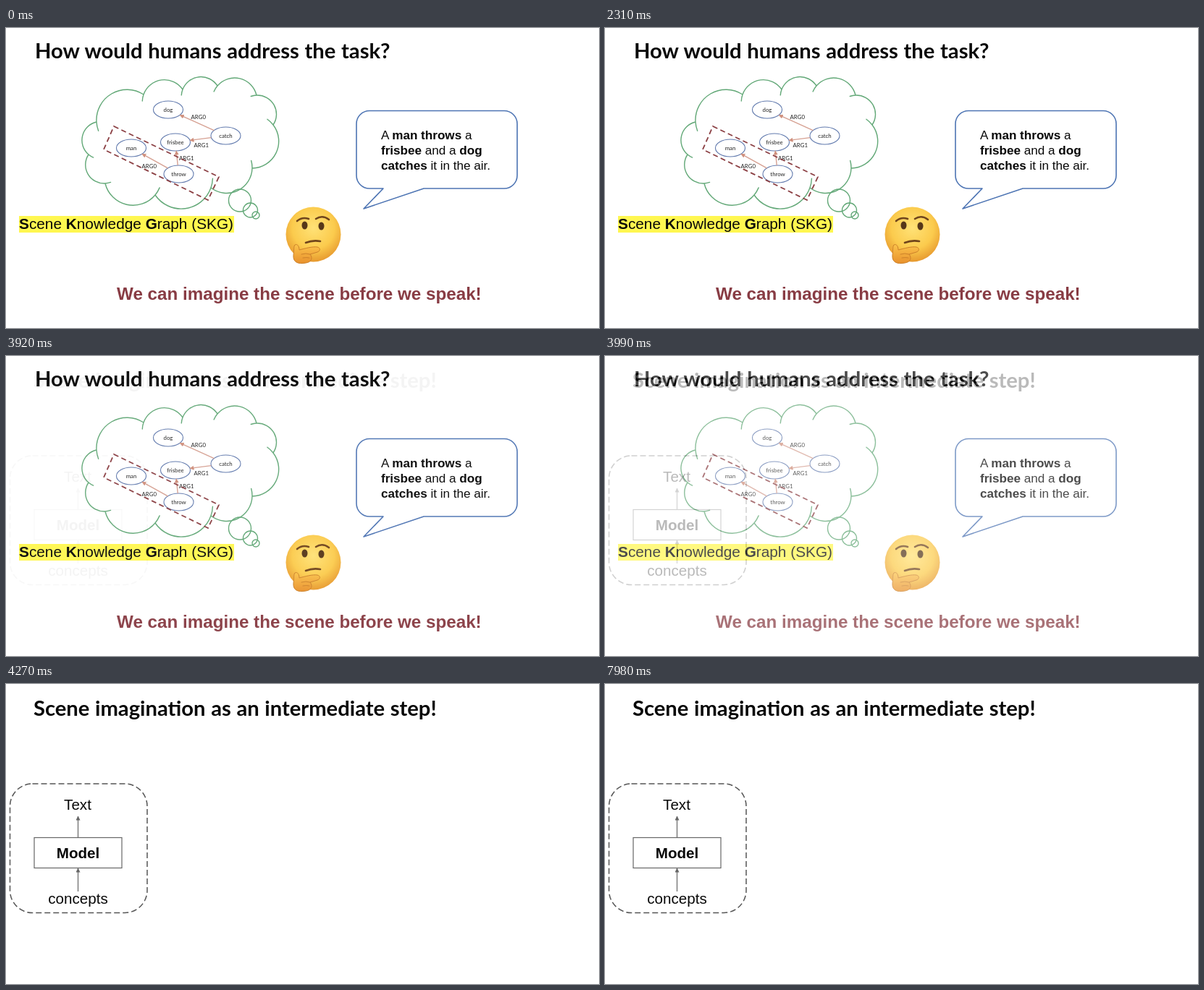
Animation, 819 px wide and 415 px high, one loop 8 s. Source, as an HTML page:

```html
<!DOCTYPE html>
<html lang="en">
<head>
<meta charset="utf-8">
<title>Scene imagination</title>
<style>
  html, body { margin: 0; width: 100%; height: 100%; overflow: hidden; background: #fff; }
  svg { display: block; width: 819px; height: 415px; }
  text { font-family: "Liberation Sans", Arial, sans-serif; fill: #080808; }
  .title { font: bold 29.2px Lato, sans-serif; word-spacing: .5px; }
  .bold, tspan { font-weight: bold; }
  .mid { text-anchor: middle; }
  .speech { font-size: 17.1px; }
  .label { font-size: 20.6px; }
  .small text { font: 7.8px Lato, sans-serif; text-anchor: middle; fill: #222; }
  .line { fill: none; stroke-linecap: round; stroke-linejoin: round; }
</style>
</head>
<body>
<svg viewBox="0 0 819 415">
  <defs>
    <radialGradient id="skin" cx=".5" cy=".38" r=".64">
      <stop offset="0" stop-color="#ffe277"/>
      <stop offset=".6" stop-color="#fbcb4d"/>
      <stop offset="1" stop-color="#e5952c"/>
    </radialGradient>
    <linearGradient id="palm" x2="0" y2="1">
      <stop offset="0" stop-color="#fbc34b"/>
      <stop offset="1" stop-color="#e8912d"/>
    </linearGradient>
    <marker id="tan" viewBox="0 0 6 6" refX="5.5" refY="3" markerWidth="6" markerHeight="6" markerUnits="userSpaceOnUse" orient="auto">
      <path d="M0 0 6 3 0 6z" fill="#cf8f7c"/>
    </marker>
    <marker id="gray" viewBox="0 0 6 6" refX="5.5" refY="3" markerWidth="6" markerHeight="6" markerUnits="userSpaceOnUse" orient="auto">
      <path d="M0 0 6 3 0 6z" fill="#666"/>
    </marker>
  </defs>

  <g id="humans">
    <rect width="819" height="415" fill="#fff"/>
    <text class="title" x="40" y="42">How would humans address the task?</text>

    <g class="line" stroke="#62a877" stroke-width="1.4">
      <path id="cloud"/>
      <circle cx="323" cy="238.5" r="15.5"/>
      <circle cx="337.5" cy="252" r="10"/>
      <circle cx="345" cy="259" r="5"/>
    </g>
    <g id="graph" class="small"></g>
    <path d="M149 136 294 206 279 238 135 168z" fill="none" stroke="#8b3f43" stroke-width="1.8" stroke-dasharray="7 4.5"/>

    <rect x="18" y="260" width="297" height="23" fill="#fff750"/>
    <text x="18" y="278" font-size="20.8"><tspan>S</tspan>cene <tspan>K</tspan>nowledge <tspan>G</tspan>raph (SKG)</text>

    <path class="line" stroke="#4d74b3" stroke-width="1.6"
      d="M502 114.5H688a18 18 0 0 1 18 18V204a18 18 0 0 1-18 18H577L494 250 521 222H502a18 18 0 0 1-18-18V132.5a18 18 0 0 1 18-18z"/>
    <g class="speech">
      <text x="518" y="154">A <tspan>man throws</tspan> a</text>
      <text x="518" y="175"><tspan>frisbee</tspan> and a <tspan>dog</tspan></text>
      <text x="518" y="196"><tspan>catches</tspan> it in the air.</text>
    </g>

    <g id="thinker">
      <circle cx="424.5" cy="285.5" r="38" fill="url(#skin)"/>
      <ellipse cx="412.5" cy="273" rx="4" ry="5.5" fill="#563719"/>
      <ellipse cx="435.5" cy="274" rx="4" ry="5.5" fill="#563719"/>
      <g class="line" stroke="#70451c" stroke-width="2.6">
        <path d="M402 267q7-6 16-3"/>
        <path d="M428 264q9-6 18 1"/>
        <path d="M414 297q10-4 20-2"/>
      </g>
      <path d="M399 300c4-2 6 3 6 7 8-2 18-5 25-4 5 1 4 6 0 7l-10 3c4 5 2 11-6 12-11 2-18-1-17-11 1-6 0-12 2-14z"
        fill="url(#palm)" stroke="#cc812a"/>
      <path class="line" d="M408 313q6-2 12 0M410 318q5-1 9 0" stroke="#cc812a"/>
    </g>
    <text class="bold" x="153" y="375.5" font-size="24.2" style="fill:#883c44">We can imagine the scene before we speak!</text>
  </g>

  <g id="model" opacity="0">
    <rect width="819" height="415" fill="#fff"/>
    <text class="title" x="38" y="44">Scene imagination as an intermediate step!</text>
    <rect x="5.5" y="138" width="189.5" height="178.5" rx="31" fill="none" stroke="#555" stroke-width="1.5" stroke-dasharray="8 4"/>
    <rect x="39" y="212.5" width="121" height="42" fill="none" stroke="#666" stroke-width="1.2"/>
    <g stroke="#777" stroke-width="1.4">
      <path d="M99.5 287V255" marker-end="url(#gray)"/>
      <path d="M99.5 212V183" marker-end="url(#gray)"/>
    </g>
    <g class="label mid">
      <text x="99" y="174">Text</text>
      <text class="bold" x="99.5" y="241">Model</text>
      <text x="99.5" y="304">concepts</text>
    </g>
  </g>
</svg>
<script>
const byId = id => document.getElementById(id);

// Each cloud lobe is a circular arc between two cusps, begun a little early to leave a fold inside.
const cusps = [[125, 130], [190, 92], [244, 85], [292, 80], [346, 93], [369, 134],
  [340, 194], [283, 221], [206, 231], [137, 215], [114, 175]];
const ROUNDNESS = .56, FOLD = .3;

function lobe([x1, y1], [x2, y2]) {
  const dx = x2 - x1, dy = y2 - y1;
  const r = ROUNDNESS * Math.hypot(dx, dy);
  const inset = Math.sqrt(ROUNDNESS ** 2 - .25);
  const cx = (x1 + x2) / 2 - dy * inset, cy = (y1 + y2) / 2 + dx * inset;
  const start = Math.atan2(y1 - cy, x1 - cx) - FOLD;
  return `M${cx + r * Math.cos(start)} ${cy + r * Math.sin(start)}A${r} ${r} 0 0 1 ${x1} ${y1}A${r} ${r} 0 0 1 ${x2} ${y2}`;
}
byId("cloud").setAttribute("d",
  cusps.map((cusp, i) => lobe(cusp, cusps[(i + 1) % cusps.length])).join(""));

const nodes = { dog: [224, 113], catch: [303.5, 149], frisbee: [234, 158], man: [173, 166], throw: [238.5, 202] };
// From, to, role, and the role's offset from the middle of the edge.
const edges = [["catch", "dog", "ARG0", 2, -5], ["catch", "frisbee", "ARG1", 1, 11],
  ["throw", "frisbee", "ARG1", 13, 3], ["throw", "man", "ARG0", -8, 10]];
const RX = 20.5, RY = 12;
const label = (word, x, y) => `<text x="${x}" y="${y}">${word}</text>`;

function edge([from, to, role, ox, oy]) {
  const [x1, y1] = nodes[from], [x2, y2] = nodes[to];
  const dx = x2 - x1, dy = y2 - y1;
  const trim = 1 / Math.hypot(dx / RX, dy / RY);
  const at = k => `${x1 + dx * k} ${y1 + dy * k}`;
  return `<path d="M${at(trim)} ${at(1 - trim)}" stroke="#d6a092" stroke-width="1.4" marker-end="url(#tan)"/>` +
    label(role, x1 + dx / 2 + ox, y1 + dy / 2 + oy);
}
const node = ([word, [x, y]]) =>
  `<ellipse cx="${x}" cy="${y}" rx="${RX}" ry="${RY}" fill="#fff" stroke="#6079ad" stroke-width="1.1"/>` +
  label(word, x, y + 2.5);
byId("graph").innerHTML = Object.entries(nodes).map(node).join("") + edges.map(edge).join("");

// Logistic cross-fade to the second slide, sampled on a fixed tick.
const LOOP = 8000, TICK = 70, MIDDLE = 4020, SOFTNESS = 31;
const began = performance.now();

function draw(now) {
  const time = Math.max(0, now - began) % LOOP;
  const tick = Math.floor(time / TICK) * TICK;
  byId("model").setAttribute("opacity", 1 / (1 + Math.exp((MIDDLE - tick) / SOFTNESS)));
  requestAnimationFrame(draw);
}
requestAnimationFrame(draw);
</script>
</body>
</html>
```
